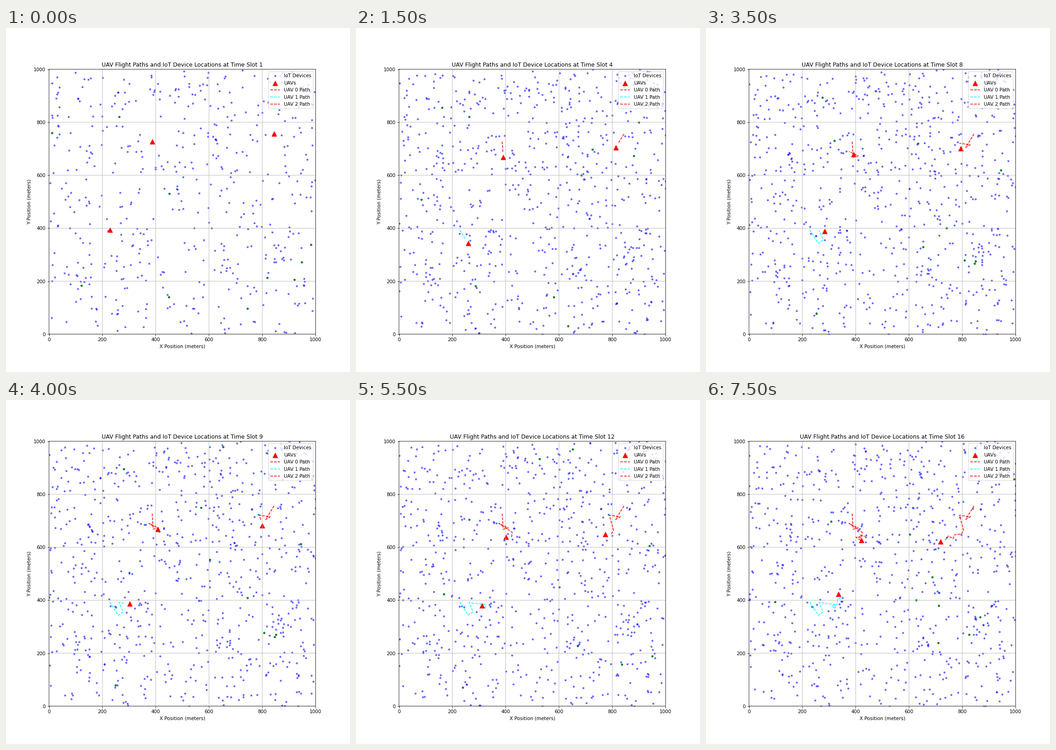
A matplotlib script that plays this animation: 748x748 px, repeating every 8000 ms.

```python
import numpy as np
import matplotlib.pyplot as plt
from matplotlib.animation import FuncAnimation

SIZE, DPI = 748, 74.8
SLOTS, AREA = 16, 1000
FIRST, TOTAL = 500, 780     # devices at the start and once settled
SERVED, SWAP = 10, 3        # devices served at once, replaced per slot
COLORS = ("red", "cyan", "red")

# Turning points in metres; UAVs fly straight and evenly between them.
TURNS = (1, 4, 5, 7, 10, 11, 12, 13, 14, 15, 16)
ROUTES = (
    [(387, 727), (391, 668), (410, 673), (375, 690), (425, 656), (422, 638),
     (401, 638), (418, 627), (416, 646), (434, 641), (421, 627)],
    [(228, 393), (260, 343), (278, 356), (263, 391), (323, 384), (324, 368),
     (311, 379), (330, 383), (332, 403), (349, 411), (335, 423)],
    [(844, 756), (813, 705), (830, 715), (789, 721), (805, 663), (796, 650),
     (773, 648), (765, 632), (748, 643), (737, 628), (719, 621)],
)


def fly(route):
    """Position of one UAV at every time slot."""
    slots = np.arange(1, SLOTS + 1)
    return np.column_stack([np.interp(slots, TURNS, axis)
                            for axis in zip(*route)])


paths = [fly(route) for route in ROUTES]

# Devices start anywhere and wander with a small random step each slot.
rng = np.random.default_rng(7)
walk = rng.normal(0, 3.5, (SLOTS, TOTAL, 2))
walk[0] = rng.uniform(0, AREA, (TOTAL, 2))
devices = np.clip(walk.cumsum(axis=0), 0, AREA)
queue = rng.permutation(FIRST)

plt.rcParams["path.snap"] = False
fig, ax = plt.subplots(figsize=(SIZE / DPI, SIZE / DPI), dpi=DPI)
ax.set(xlim=(0, AREA), ylim=(0, AREA),
       xlabel="X Position (meters)", ylabel="Y Position (meters)")
ax.grid(True)

dots = ax.scatter([], [], s=10, c="blue", alpha=0.5, label="IoT Devices")
stars = ax.scatter([], [], s=20, c="green", marker="*")
uavs = ax.scatter([], [], s=100, c="red", marker="^", label="UAVs")
trails = [ax.plot([], [], "--", color=color, label=f"UAV {i} Path")[0]
          for i, color in enumerate(COLORS)]
ax.legend(loc="upper right", labelspacing=0.53)
title = ax.set_title("", fontsize=11.9)


def update(i):
    count = int(TOTAL - (TOTAL - FIRST) * np.exp(-0.8 * i))
    dots.set_offsets(devices[i, :count])
    stars.set_offsets(devices[i, queue[SWAP * i:SWAP * i + SERVED]])
    uavs.set_offsets([path[i] for path in paths])
    for trail, path in zip(trails, paths):
        trail.set_data(*path[:i].T)
    title.set_text("UAV Flight Paths and IoT Device Locations "
                   f"at Time Slot {i + 1}")
    return [dots, stars, uavs, *trails, title]


anim = FuncAnimation(fig, update, frames=SLOTS, interval=500, repeat=True)
plt.show()
```
